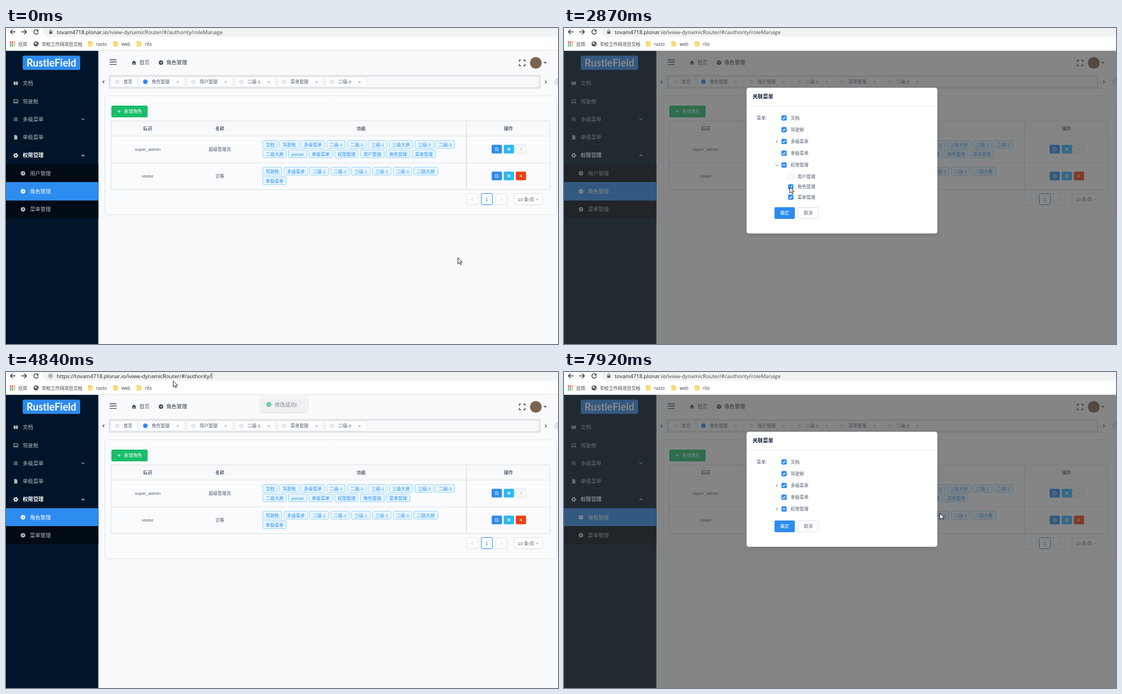
Animation, 990 px wide and 566 px high, one loop 8 s. Source, as an HTML page with a canvas:

```html
<!DOCTYPE html>
<html lang="zh">
<head>
<meta charset="utf-8">
<title>角色管理</title>
<style>
html, body { margin: 0; width: 100%; height: 100%; overflow: hidden; background: #fff; }
canvas { display: block; }
</style>
</head>
<body>
<canvas id="stage" width="990" height="566"></canvas>
<script>
const g = document.getElementById('stage').getContext('2d');
const UI = '"Liberation Sans", "Noto Sans CJK SC", "Noto Sans CJK", sans-serif';
const CHROME = '"Open Sans", "Noto Sans CJK SC", "Noto Sans CJK", sans-serif';
const BLUE = '#2d8cf0', CYAN = '#2db7f5', GREEN = '#19be6b', RED = '#ed4014';
const INK = '#515a6e', SLATE = '#67647e', LINE = '#e3e5e9', PAGE = '#f9fafc';
const LOOP = 8000;

// Screen updates come in bursts: [first, last, count].
const bursts = [[0, 0, 1], [350, 1120, 8], [1220, 1980, 8], [2090, 2640, 6], [2870, 3420, 6],
  [3600, 3600, 1], [3660, 4310, 7], [4420, 4530, 2], [4840, 5080, 3], [5270, 5390, 2],
  [5840, 6590, 8], [6710, 7470, 8], [7580, 7920, 4]];
const steps = bursts.flatMap(([a, b, n]) =>
  Array.from({ length: n }, (_, i) => a + (n > 1 ? (b - a) * i / (n - 1) : 0)));

// Tracks: [time, value, ...]
const mouse = [[240, 810.5, 411.5], [900, 902, 221], [1437, 902, 221], [1654, 583, 236],
  [1763, 401, 245], [1980, 380, 242], [2200, 380, 242], [2420, 407, 264], [2640, 408, 267],
  [2760, 408, 267], [3200, 396, 338], [3420, 396, 338], [3600, 372, 190], [3660, 353, 77],
  [3770, 310, 18], [3880, 300, 16], [5840, 300, 16], [6161, 12, 9], [6270, 12, 9],
  [6590, 120, 62], [7250, 902, 221], [7690, 901, 221], [7800, 880, 238], [7920, 674, 253]];
const dialog = [[1280, 0], [1560, 1], [3310, 1], [3420, .7], [3590, 0], [7600, 0], [7910, 1]];
const tooltip = [[1000, 0], [1120, 1], [1220, 1], [1320, 0], [7360, 0], [7470, .6], [7580, 1], [7690, 0]];
const expand = [[2080, 0], [2310, 1], [3600, 1], [3601, 0]];
const loading = [[3310, 0], [3420, .35], [3660, .67], [3770, .67], [4000, 0]];
const notice = [[3310, 0, -45], [3420, .35, -33], [3600, 1, 0], [4740, 1, 0], [5070, 0, -30]];
const veil = [[5160, 0], [5270, .5], [5390, 1], [6160, 1], [6270, .5], [6380, 0]];

function at(t, keys) {
  const i = keys.findIndex(k => k[0] > t);
  if (i < 1) return keys.at(i).slice(1);
  const a = keys[i - 1], b = keys[i], p = (t - a[0]) / (b[0] - a[0]);
  return a.slice(1).map((v, j) => v + (b[j + 1] - v) * p);
}

function box(x, y, w, h, fill, r = 0, stroke, lw = 1) {
  g.beginPath();
  g.roundRect(x, y, w, h, r);
  if (fill) { g.fillStyle = fill; g.fill(); }
  if (stroke) { g.strokeStyle = stroke; g.lineWidth = lw; g.stroke(); }
}
function dot(x, y, r, fill) {
  g.beginPath();
  g.arc(x, y, r, 0, 7);
  g.fillStyle = fill;
  g.fill();
}
function oval(x, y, rx, ry, fill, turn = 0) {
  g.beginPath();
  g.ellipse(x, y, rx, ry, turn, 0, 7);
  g.fillStyle = fill;
  g.fill();
}
function shape(d, fill, x = 0, y = 0) {
  g.save();
  g.translate(x, y);
  g.fillStyle = fill;
  g.fill(new Path2D(d));
  g.restore();
}
function wire(d, color, lw = 1, x = 0, y = 0) {
  g.save();
  g.translate(x, y);
  g.strokeStyle = color;
  g.lineWidth = lw;
  g.stroke(new Path2D(d));
  g.restore();
}
// y is the visual middle of the line
function text(s, x, y, size = 8, color = INK, align = 'center', weight = 400, face = UI) {
  g.font = `${weight} ${size}px ${face}`;
  g.textAlign = align;
  g.fillStyle = color;
  g.fillText(s, x, y + size * .37);
}
const cross = (x, y, c, r = 2.2, lw = 1) => wire(`M${-r} ${-r}L${r} ${r}M${r} ${-r}L${-r} ${r}`, c, lw, x, y);
const bars = (x, y, c, w = 6, gap = 2) =>
  wire([-gap, 0, gap].map(d => `M${-w / 2} ${d}h${w}`).join(''), c, 1, x, y);
const chevron = {
  down: 'M-2.6 -1.3L0 1.3L2.6 -1.3', up: 'M-2.6 1.3L0 -1.3L2.6 1.3',
  left: 'M1.3 -2.6L-1.3 0L1.3 2.6', right: 'M-1.3 -2.6L1.3 0L-1.3 2.6'
};
function compass(x, y, c, hole) {
  dot(x, y, 4, c);
  shape('M-2 .2L2 -1.8L.4 2L0 .4Z', hole, x, y);
}

function browser(t) {
  const away = t >= 5270 && t < 6270, editing = t >= 4420 && t < 5270;
  box(0, 0, 990, 41, '#fff');
  box(66, -10, 960, 25.5, '#f0f2f3', 12);
  const arrow = 'M5 0H-4M0 -4.2L-4.2 0L0 4.2';
  wire(arrow, '#3c4043', 1.4, 12, 7);
  g.save();
  g.translate(32.5, 7);
  g.scale(-1, 1);
  wire(arrow, away ? '#b9bbbe' : '#3c4043', 1.4);
  g.restore();
  wire('M3.4 -2.2A4 4 0 1 0 4 1', '#3c4043', 1.4, 54, 7);
  shape('M4.4 -4.6V-.6H.4Z', '#3c4043', 54, 7);
  if (editing && t >= 4840) {
    wire('M3.5 0A3.5 3.5 0 1 0 3.5 .1M-3.5 0H3.5M0 -3.5V3.5', '#5f6368', .8, 80, 7);
  } else {
    box(77.5, 6, 5.6, 4.6, '#5f6368', .5);
    wire('M-1.6 0V-1.6A1.6 1.6 0 0 1 1.6 -1.6V0', '#5f6368', .9, 80.3, 6);
  }
  const tail = t < 4840 || t >= 6270 ? 'roleManage' : t < 4950 ? '' : t < 5080 ? 'user' : 'userManage';
  const host = (editing ? 'https://' : '') + 'tovam4718.plonar.io';
  const path = '/iview-dynamicRouter/#/authority/' + tail;
  g.font = `400 9.5px ${CHROME}`;
  const hw = g.measureText(host).width, pw = g.measureText(path).width;
  if (editing && t < 4530) box(91, 1, hw + pw, 13, '#b4d5fe');
  text(host, 91, 7, 9.5, '#202124', 'left', 400, CHROME);
  text(path, 91 + hw, 7, 9.5, editing ? '#202124' : '#4a4d51', 'left', 400, CHROME);
  if (editing && t >= 4530) box(91.5 + hw + pw, 1.5, .8, 11, '#202124');

  const tints = ['#ea4335', '#ea4335', '#f29900', '#34a853', '#4285f4', '#f29900', '#34a853', '#4285f4', '#fbbc04'];
  tints.forEach((c, i) => box(7 + i % 3 * 3.4, 24 + (i / 3 | 0) * 3.4, 2.3, 2.3, c));
  const mark = (s, x) => text(s, x, 28.7, 8.1, '#3c4043', 'left', 400, CHROME);
  mark('应用', 22);
  dot(54, 28.5, 4.6, '#505357');
  shape('M-3 -2L0 -3L1 -1L-1 1ZM1 1L3 0L2 3Z', '#fff', 54, 28.5);
  mark('学校工作网项目文档', 64);
  [['rasto', 147], ['web', 192.5], ['rilo', 234.5]].forEach(([s, x]) => {
    box(x, 24, 8.5, 9, '#fbdc74', 1);
    box(x, 24, 4, 2, '#eec24c', 1);
    mark(s, x + 14.7);
  });
  box(0, 40, 990, 1, '#dfe1e4');
}

function sidebar(trimmed) {
  const soft = '#b3b9bf', width = 165.6;
  box(0, 41, width, 525, '#001529');
  box(30, 49.5, 103, 25.5, BLUE, 3);
  text('RustleField', 81.5, 62, 18, '#fff', 'center', 700, 'Lato, sans-serif');
  ['文档', '驾驶舱', '多级菜单', '单极菜单', '权限管理'].forEach((s, i) => {
    text(s, 30, 99 + i * 32.25, 9.33, i === 4 ? '#fff' : soft, 'left', i === 4 ? 700 : 400);
  });
  shape('M-3.8 -3Q-1.5 -3.6 -.3 -2.6V3.2Q-1.5 2.4 -3.8 3ZM3.8 -3Q1.5 -3.6 .3 -2.6V3.2Q1.5 2.4 3.8 3Z', soft, 17.5, 99);
  wire('M-3.4 -2.8H3.4V1.8H-3.4ZM-4.6 3.2H4.6', soft, 1, 17.5, 131);
  bars(17.5, 163.5, soft, 7, 2.3);
  shape('M-2.8 -4H.8L2.8 -2V4H-2.8Z', soft, 17.5, 195.7);
  g.setLineDash([1.7, 1.44]);
  wire('M3.5 0A3.5 3.5 0 1 0 3.5 .1', '#fff', 1.6, 17.5, 228.3);
  g.setLineDash([]);
  wire('M2.4 0A2.4 2.4 0 1 0 2.4 .1', '#fff', 1.8, 17.5, 228.3);
  wire(chevron.down, soft, 1.1, 138, 163.5);
  wire(chevron.up, '#fff', 1.1, 138, 228.5);
  const subs = trimmed ? ['角色管理', '菜单管理'] : ['用户管理', '角色管理', '菜单管理'];
  const top = i => Math.round(244 + i * 32.3);
  box(0, 244, width, top(subs.length) - 244, '#000b16');
  subs.forEach((s, i) => {
    const y = 260.2 + i * 32.3, on = s === '角色管理';
    if (on) box(0, top(i), width, top(i + 1) - top(i), BLUE);
    compass(30.5, y, on ? '#fff' : soft, on ? BLUE : '#000b16');
    text(s, 43, y, 9.33, on ? '#fff' : soft, 'left');
  });
}

function topbar() {
  wire('M186 57H198.5M186 61H198.5M186 65.3H198.5', '#444b58', 1.3);
  shape('M-4.2 .3L0 -4L4.2 .3H3V4H.9V1.2H-.9V4H-3V.3Z', '#464c5b', 229.5, 62);
  text('首页', 239, 62, 9.33, INK, 'left');
  text('/', 267.5, 62, 8, '#d7dade');
  compass(278, 62, '#464c5b', PAGE);
  text('角色管理', 287.5, 62, 9.33, '#2c3340', 'left', 500);
  wire('M-5 -2V-5H-2M2 -5H5V-2M5 2V5H2M-2 5H-5V2', '#464c5b', 1.6, 925.7, 62.5);
  dot(950.3, 62.5, 10.5, '#7d6450');
  shape('M-3 -1.5H3L0 1.5Z', '#464c5b', 967, 62.5);

  wire(chevron.left, '#464c5b', 1.2, 175, 96.5);
  wire(chevron.right, '#464c5b', 1.2, 968, 96.5);
  wire('M4.6 0A4.6 4.6 0 1 0 4.6 .1', '#8d939f', .9, 989, 96.5);
  cross(989, 96.5, '#8d939f', 1.8, .9);
  box(185.5, 85.5, 772, 22, '#f7f8fa', 0, '#dfe1e6', 2.6);
  [['首页', 188, 236], ['角色管理', 238.5, 321], ['用户管理', 324.5, 407], ['二级-1', 410.5, 484],
    ['菜单管理', 487.5, 570], ['二级-3', 573.5, 647]].forEach(([s, a, b], i) => {
    box(a, 87.5, b - a, 18, '#fbfcfd', 1, '#e6e8ec');
    dot(a + 11.5, 96.3, 4.1, i === 1 ? BLUE : '#e6e8ec');
    text(s, a + 22.7, 96.5, 8, INK, 'left');
    if (i) cross(b - 13, 97, '#a3a8b2', 2, .9);
  });
}

function tags(list, x, y) {
  for (const s of list.split(' ')) {
    g.font = `400 8px ${UI}`;
    const w = g.measureText(s).width + 11.4;
    const left = Math.round(x), right = Math.round(x + w);
    box(left + .5, Math.round(y - 7) - .5, right - left - 1, 14, '#e8f6fe', 2, '#93d4fb');
    text(s, x + w / 2, y, 8, '#2790f8');
    x += w + 2.85;
  }
}

function actions(y, locked, lit) {
  box(871, y - 7.7, 18.5, 15.4, BLUE, 2);
  wire('M.8 -2.4H-2.4V2.4H2.4V-.4M-.6 .6L2.8 -2.8', '#fff', .9, 880.2, y);
  box(892.7, y - 7.7, 18.5, 15.4, lit ? '#57c5f7' : CYAN, 2);
  bars(902, y, '#fff', 5, 1.7);
  if (locked) box(914.5, y - 7.5, 18, 15, '#f7f7f7', 2, '#dfe1e5');
  else box(914.3, y - 7.7, 18.5, 15.4, RED, 2);
  cross(923.5, y, locked ? '#c5c8ce' : '#fff', 2, 1);
}

function card(t, mx, my, live) {
  const inside = (x, y, w, h) => live && mx >= x && mx < x + w && my >= y && my < y + h;
  const over = inside(178, 122, 809, 213);
  g.save();
  if (over) { g.shadowColor = 'rgba(0,0,0,.3)'; g.shadowBlur = 5; g.shadowOffsetY = 1; }
  box(177.5, 121.5, 810, 213, '#fafbfd', 3);
  g.restore();
  if (!over) box(177.5, 121.5, 810, 213, null, 3, LINE);
  box(189, 139, 65, 21, GREEN, 2);
  wire('M-2.6 0H2.6M0 -2.6V2.6', '#fff', 1, 203, 149.3);
  text('新增角色', 228, 149.3, 8, '#fff', 'center', 500);

  box(189, 167, 787, 26, '#f8f9fb');
  [193, 241].forEach(y => {
    if (inside(189, y, 787, 48)) box(189, y, 787, 48, '#ebf7ff');
  });
  [193, 241].forEach(y => box(189, y, 787, 1, LINE));
  [['标识', 254], ['名称', 383.5], ['功能', 637], ['操作', 901]].forEach(([s, x]) =>
    text(s, x, 180, 8, INK, 'center', 700));
  text('super_admin', 254, 217);
  text('超级管理员', 383.5, 217);
  text('visitor', 254, 265);
  text('访客', 383.5, 265);
  tags('文档 驾驶舱 多级菜单 二级-1 二级-2 三级-1 三级大屏 三级-2 二级-3', 460, 208.7);
  tags('二级大屏 plonar 单极菜单 权限管理' + (t < 3600 ? ' 用户管理' : '') + ' 角色管理 菜单管理', 460, 225.7);
  tags('驾驶舱 多级菜单 二级-1 二级-2 三级-1 三级-2 二级-3 二级大屏', 460, 256.7);
  tags('单极菜单', 460, 273.7);
  box(825, 167, 2, 122, '#e4e6ea');
  actions(217, true, inside(892, 209, 20, 16));
  actions(265, false, inside(892, 257, 20, 16));
  const [busy] = at(t, loading);
  if (busy) {
    g.globalAlpha = busy;
    box(189, 167, 787, 123, '#fafbfd');
    g.globalAlpha = 1;
  }
  box(188.5, 166.5, 787, 123, null, 0, '#dcdee2');

  const pale = '#c5c8ce';
  [[826, LINE], [852, BLUE], [878, LINE]].forEach(([x, c]) => box(x + .5, 296.5, 20, 20, '#fcfdfe', 2, c));
  wire(chevron.left, pale, 1, 836.3, 307);
  text('1', 862.3, 306.8, 9.33, BLUE);
  wire(chevron.right, pale, 1, 888.7, 307);
  box(911.5, 296.5, 51, 20, '#fcfdfe', 2, '#dcdee2');
  text('10 条/页', 918, 306.8, 8, INK, 'left');
  wire(chevron.down, '#808695', .9, 952.5, 306.8);
}

function tip(a) {
  g.globalAlpha = a;
  box(880, 181.5, 47, 22.5, 'rgba(70,76,91,.92)', 3);
  shape('M-3.5 0H3.5L0 3.3Z', 'rgba(70,76,91,.92)', 903, 204);
  text('关联菜单', 903.3, 192.7, 8, '#fff');
  g.globalAlpha = 1;
}

function check(x, y, state) {
  box(x - 4.3, y - 4.3, 8.6, 8.6, state && BLUE, 1.3, state ? BLUE : '#dcdee2', .9);
  if (state === 'on') wire('M-2.4 0L-.6 1.9L2.5 -1.8', '#fff', 1.3, x, y);
  if (state === 'part') wire('M-2.8 0H2.8', '#fff', 1.4, x, y);
}

function modal(t, k, mx, my) {
  const [e] = at(t, expand), drop = 55 * e, h = 206 + drop, cy = 107 + h / 2;
  const unticked = t >= 2520;
  g.fillStyle = `rgba(55,55,55,${.6 * k ** 1.6})`;
  g.fillRect(0, 41, 990, 525);
  g.save();
  g.globalAlpha = k;
  g.translate(498.5, cy);
  g.scale(.9 + k / 10, .9 + k / 10);
  g.translate(-498.5, -cy);
  g.save();
  g.shadowColor = 'rgba(0,0,0,.1)';
  g.shadowBlur = 7;
  g.shadowOffsetY = 3;
  box(327.5, 107, 342, h, '#fff', 4);
  g.restore();
  text('关联菜单', 338, 122.7, 9.33, '#17233d', 'left', 700);
  box(327.5, 139, 342, 1, '#e8eaec');
  text('菜单:', 345.5, 161, 8, INK, 'left');
  ['文档', '驾驶舱', '多级菜单', '单极菜单', '权限管理'].forEach((s, i) => {
    const y = 161 + i * 21.1;
    if (mx > 399 && mx < 440 && Math.abs(my - y) < 10 && t < 3000) box(404, y - 10, 37, 20.5, '#eaf4fe', 2);
    check(394.7, y, i === 4 && unticked ? 'part' : 'on');
    text(s, 406.5, y, 8, INK, 'left');
    if (i === 2 || i === 4) wire(i === 4 && e > .5 ? chevron.down : chevron.right, INK, 1, 381.7, y + .3);
  });
  if (e) {
    g.save();
    g.globalAlpha *= e;
    ['用户管理', '角色管理', '菜单管理'].forEach((s, i) => {
      const y = 266 + i * 18.5 - 12 * (1 - e);
      check(406.7, y, i || !unticked ? 'on' : '');
      text(s, 418.8, y, 8, INK, 'left');
    });
    g.restore();
  }
  const pressed = t >= 3300 && t < 3600;
  box(377.5, 266 + drop, 36.5, 21, pressed ? '#57a3f3' : BLUE, 2, pressed && 'rgba(45,140,240,.3)', 2);
  text('确定', 395.7, 276.4 + drop, 8, '#fff', 'center', 500);
  box(419.5, 266.5 + drop, 36.5, 20, null, 2, '#dcdee2');
  text('取消', 438, 276.4 + drop);
  g.restore();
}

function message(a, dy) {
  g.save();
  g.beginPath();
  g.rect(0, 41, 990, 100);
  g.clip();
  g.globalAlpha = a;
  g.shadowColor = 'rgba(0,0,0,.2)';
  g.shadowBlur = 4;
  g.shadowOffsetY = 1;
  box(456, 54 + dy, 85, 26.5, '#fbfcfd', 3);
  g.shadowColor = 'transparent';
  dot(471.3, 67.3 + dy, 4.4, GREEN);
  wire('M-2 0L-.5 1.6L2.1 -1.4', '#fff', 1, 471.3, 67.3 + dy);
  text('修改成功!', 482, 67.3 + dy, 9.33, INK, 'left');
  g.restore();
}

function city() {
  const wall = '#c8dcf5', pane = '#dfeafa';
  shape('M268 411V223H283V191H337V223H352V330H372V300H415V271H475V317H498V303H513V317H537V181H597V187H610V162H636V188H650V223H665V271H687V240H705V271H727V411Z', wall);
  box(283, 191, 8.5, 26, pane);
  for (let i = 0; i < 7; i++) [277, 322].forEach(x => box(x, 234 + i * 22.6, 21, 12, pane));
  for (let i = 0; i < 5; i++) box(360, 342 + i * 8.4, 30, 5.5, pane);
  for (let i = 0; i < 3; i++) box(482, 345 + i * 8.3, 47.5, 6, pane);
  for (let i = 0; i < 4; i++) box(592, 236.5 + i * 40.4, 64, 19, pane);
  [191, 218, 261, 305, 350].forEach(y => box(537, y, 17, 22.5, pane));
  [282, 336].forEach(y => box(452, y, 13, 17, pane));
  [282, 322, 364].forEach(y => box(705, y, 22, 28, pane));
  [[363, 170], [480, 228], [681, 152]].forEach(([x, y]) => {
    box(x + 3, y, 29, 5, '#e0e0e0', 2);
    box(x, y + 4, 35, 5, '#e0e0e0', 2);
    box(x + 3, y + 8, 30, 5, '#e0e0e0', 2);
  });
  shape('M297 440Q360 425 460 420Q560 418 645 433Q600 448 565 451Q515 446 480 466Q440 487 400 481Q340 473 297 440Z', '#e3e3e3');
}

function runner() {
  const parts = [
    ['M358 298L369 306Q360 320 359 331Q354 338 349 334Q348 318 358 298Z', '#fbc5cb'],
    ['M474 303L486 288Q494 279 499 282Q498 296 478 317Z', '#fbc5cb'],
    ['M330 378L341 381Q333 395 334 402L327 416L321 412Q325 395 330 378Z', '#9a6363'],
    ['M482 434L497 426L499 436L483 443Z', '#45405a'],
    ['M481 441L497 434Q512 431 521 436L519 441Q500 443 484 448Z', '#8f5c5f'],
    ['M390 337Q408 344 427 338Q440 350 462 382Q480 408 496 424L481 435Q455 408 442 388L418 370Q415 400 404 408Q396 412 385 409Q360 401 333 399L337 382Q365 385 387 388Q392 370 390 337Z', '#585676'],
    ['M425 268Q385 266 358 296L369 306L389 292L388 341Q410 345 427 340L424 352L437 354Q441 335 441 306Q455 322 467 325L478 314L468 305Q456 300 442 279Z', '#ec7580'],
    ['M412 256Q408 240 425 236Q440 233 454 241L448 247Q440 248 428 248L420 264Q414 263 412 256Z', '#855a60'],
    ['M419 251Q432 244 443 249L444 262Q442 270 434 270L439 281L425 280L424 268Q418 262 419 251Z', '#fbc5cb']
  ];
  parts.forEach(([d]) => wire(d, '#dcdcdc', 4));
  parts.forEach(p => shape(...p));
  shape('M442 281Q456 300 468 305L478 314L467 325Q455 322 441 306Q441 335 437 354L424 352Q440 320 437 280Z', '#e06b75');
  shape('M422 283L426 278Q434 286 439 276Q446 310 428 341Q420 330 422 283Z', '#d59490');
  shape('M341 383L333 399L336 386Z', '#45405a');
}

function drone() {
  const sky = '#5ba1f2', dark = '#4d4a5f';
  wire('M565 163Q553 180 556 203M594 163Q606 180 603 203', BLUE, 5);
  box(561, 145, 37, 25, BLUE, 7);
  shape('M530 150H562L571 163L530 161ZM629 150H597L588 163L629 161Z', sky);
  [525.5, 633].forEach(x => {
    oval(x - 2, 144, 31, 2.6, '#d9dbde');
    oval(x - 15, 143, 15, 2, sky);
    oval(x + 15, 143, 15, 2, sky);
    box(x - 2.5, 139, 5, 10, BLUE, 2);
    box(x - 6, 147, 12.5, 15, BLUE, 5);
  });
  dot(579, 179.5, 10, BLUE);
  dot(579, 179.5, 6.8, '#8fc0f6');
  dot(579, 179.5, 4.8, '#2467b4');
  shape('M579 202Q570 199 572 192Q579 193 579 202Q579 193 586 192Q588 199 579 202Z', SLATE);
  box(555.5, 201, 51, 40.5, SLATE);
  box(596.5, 201, 10, 40.5, dark);
  box(560, 207, 8, 4.5, dark);
}

function plants() {
  shape('M570 350Q580 372 575 392Q572 405 566 413Q556 405 559 385Q566 372 570 350Z', BLUE);
  shape('M554 387Q566 400 566 412L560 412Q552 402 554 387Z', '#5ba1f2');
  wire('M570 360Q564 385 566 410', '#4a4a6a', .7);
  shape('M566 413Q566 403 578 402Q588 403 592 411Q590 416 580 415Z', '#a5a5a5');
  wire('M714 346Q707 370 713 385Q716 400 710 412', '#4a4a6a', 1);
  [[713, 342, 1.5], [705, 354, .6], [716, 360, -.6], [703.5, 377, .4], [721, 381, -.5], [709, 397, .5], [722, 404, -.4]]
    .forEach(([x, y, r]) => oval(x, y, 6.2, 4.8, BLUE, r));
  shape('M682 426Q690 408 702 407Q722 412 727 420Q727 428 720 430Q700 431 682 426Z', '#a5a5a5');
  wire('M682 426Q700 430 720 429Q726 427 727 421', '#858585', 1.2);
}

function lost() {
  box(0, 41, 990, 525, '#f7f7f7');
  city();
  text('404', 268, 152, 51.5, BLUE, 'left', 700, '"Open Sans", sans-serif');
  text('Oh~~您的页面好像飞走了~', 268, 188, 13.33, SLATE, 'left', 700);
  drone();
  plants();
  runner();
  text('返回首页', 598, 482.7, 9.33, INK, 'left');
  text('返回上一页(5s)', 656, 482.7, 9.33, INK, 'left');
}

function draw(t) {
  const [mx, my] = at(t, mouse), [k] = at(t, dialog), [v] = at(t, veil);
  g.clearRect(0, 0, 990, 566);
  if (v === 1) lost();
  else {
    box(0, 41, 990, 525, PAGE);
    sidebar(t >= 3600);
    topbar();
    card(t, mx, my, !k && !v);
    const [hint] = at(t, tooltip);
    if (hint) tip(hint);
    if (k) modal(t, k, mx, my);
    if (v) {
      g.fillStyle = `rgba(247,247,247,${v})`;
      g.fillRect(0, 41, 990, 525);
    }
    const [a, dy] = at(t, notice);
    if (a) message(a, dy);
  }
  browser(t);
  if (t >= 5270 && t < 6000) box(0, 40.5, t < 5390 ? 560 : 990, 1.6, BLUE);
  const arrow = 'M0 0V11L2.6 8.6L4.3 12.4L6 11.6L4.3 8H7.8Z';
  shape(arrow, '#fff', mx, my);
  wire(arrow, '#111', .9, mx, my);
}

const start = performance.now();
function tick() {
  const t = (performance.now() - start) % LOOP;
  draw(steps.findLast(s => s <= t) ?? 0);
  requestAnimationFrame(tick);
}
tick();
</script>
</body>
</html>
```
